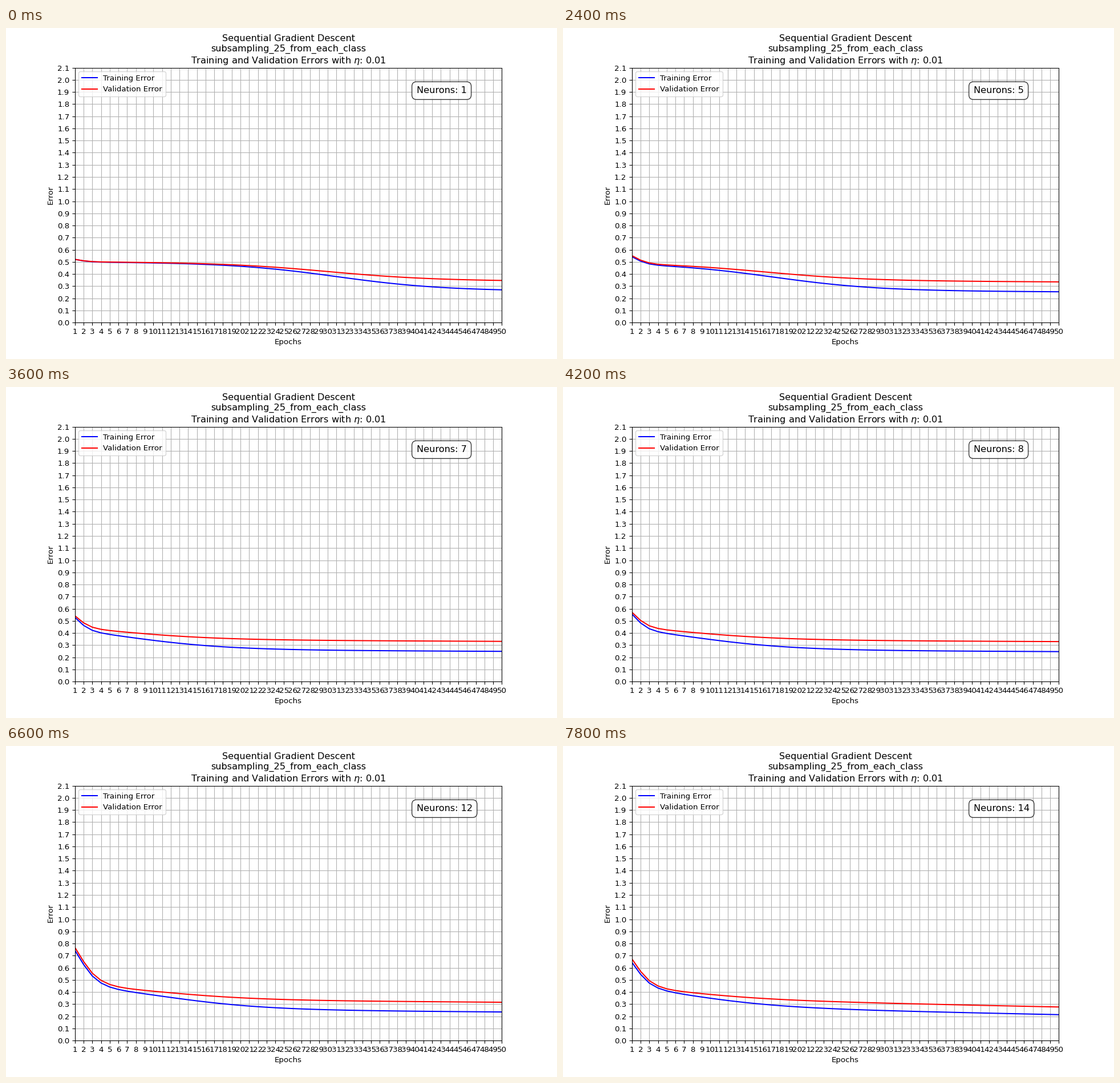
Write a matplotlib script that moves like this. It is 966x580 px and loops after 8 s.

```python
import numpy as np
import matplotlib.pyplot as plt
from matplotlib.animation import FuncAnimation

WIDTH, HEIGHT, DPI = 966, 580, 96.6
INTERVAL = 200          # ms per frame
FRAMES = 40
HOLD = 3                # frames per neuron count

EPOCHS = np.arange(1, 51)

# Key points by neuron count: first error, and epoch of the steepest descent
COUNTS = [1, 3, 5, 7, 10, 12, 14]
START = [0.521, 0.600, 0.543, 0.529, 0.612, 0.744, 0.645]
MIDDLE = [31, 18.6, 17.2, 6.3, 9.4, 10.8, 5.9]


def descent(start, floor, drop, middle, slope):
    """Sigmoid drop onto a gently sloping floor, after a quick initial fall."""
    body = (floor + slope * (50 - EPOCHS)
            + drop / (1 + np.exp((EPOCHS - middle) / 6)))
    rate = 0.65 * (0.6 / start) ** 1.5      # high starts fall more slowly
    fall = np.exp(-rate * (EPOCHS - 1) ** 1.25)
    return body + (start - body[0]) * fall


def errors(n):
    """Training and validation curves for n neurons."""
    start = np.interp(n, COUNTS, START)
    middle = np.interp(n, COUNTS, MIDDLE)
    late = 0.4 ** (14 - n)                  # only the largest nets keep improving
    slope = 0.0003 + 0.0012 * late
    train = descent(start, 0.263 - 0.002 * n - 0.0215 * late,
                    0.225, middle, slope)
    valid = descent(start + 0.0022 * (n - 1), 0.344 - 0.0018 * n - 0.042 * late,
                    0.145, middle - 1, slope)
    return train, valid


fig, ax = plt.subplots(figsize=(WIDTH / DPI, HEIGHT / DPI), dpi=DPI)
train_line, = ax.plot([], [], color="blue", label="Training Error")
valid_line, = ax.plot([], [], color="red", label="Validation Error")
badge = ax.text(0.8, 0.9, "", transform=ax.transAxes, fontsize=12,
                bbox=dict(boxstyle="round,pad=0.5", facecolor="white",
                          edgecolor="black", alpha=0.8))

ax.set_title("Sequential Gradient Descent\n"
             "subsampling_25_from_each_class\n"
             r"Training and Validation Errors with $\eta$: 0.01")
ax.set_xlabel("Epochs")
ax.set_ylabel("Error")
ax.set_xticks(EPOCHS)
ax.set_yticks(np.arange(22) / 10)
ax.set_xlim(1, 50)
ax.set_ylim(0, 2.1)
ax.grid(True)
ax.legend(loc="upper left")


def update(frame):
    neurons = 1 + frame // HOLD
    train, valid = errors(neurons)
    train_line.set_data(EPOCHS, train)
    valid_line.set_data(EPOCHS, valid)
    badge.set_text(f"Neurons: {neurons}")
    return train_line, valid_line, badge


anim = FuncAnimation(fig, update, frames=FRAMES, interval=INTERVAL,
                     init_func=lambda: update(0), repeat=True, repeat_delay=0)
plt.show()
```
